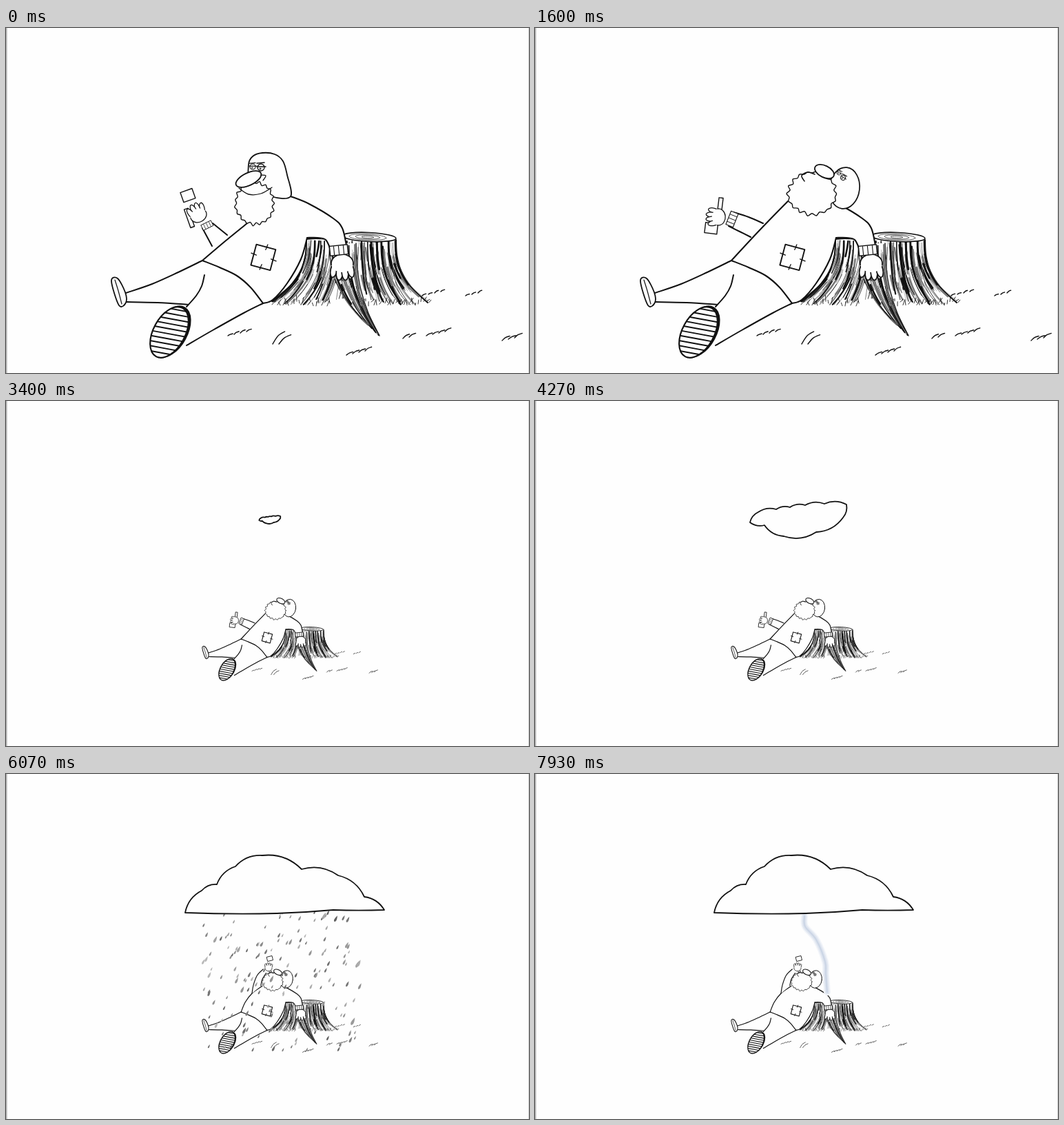
An HTML page with a canvas for the animation above (8 s loop, 759x500 px).

```html
<!DOCTYPE html>
<html>
<head>
<meta charset="utf-8">
<style>
html, body { margin: 0; height: 100%; overflow: hidden; background: #fefefe; }
canvas { display: block; }
</style>
</head>
<body>
<canvas id="stage" width="759" height="500"></canvas>
<script>
const g = document.getElementById('stage').getContext('2d');
const INK = '#111', PAPER = '#fefefe', LOOP = 8000, WIDE_FROM = 2930, PUFF_TIME = 1000;
let weight = 1;                      // line weight correction for the wide shot

const mix = (a, b, f) => a + (b - a) * f;
const unit = x => Math.max(0, Math.min(1, x));
const ease = x => { x = unit(x); return x * x * (3 - 2 * x); };
const pts = s => typeof s === 'string' ? s.trim().split(/\s+/).map(p => p.split(',').map(Number)) : s;

function rng(seed) {
  return () => (seed = (seed * 16807) % 2147483647) / 2147483647;
}

function paint(w, fill, ink = INK) {
  if (fill) { g.fillStyle = fill; g.fill(); }
  if (w) { g.strokeStyle = ink; g.lineWidth = w * weight; g.stroke(); }
}

// Smooth curve through points.
function trace(s, close) {
  const p = pts(s), n = p.length;
  const at = i => close ? p[(i + n) % n] : p[Math.max(0, Math.min(n - 1, i))];
  g.beginPath();
  g.moveTo(...p[0]);
  for (let i = 0; i < (close ? n : n - 1); i++) {
    const [a, b, c, d] = [at(i - 1), at(i), at(i + 1), at(i + 2)];
    g.bezierCurveTo(b[0] + (c[0] - a[0]) / 6, b[1] + (c[1] - a[1]) / 6,
      c[0] - (d[0] - b[0]) / 6, c[1] - (d[1] - b[1]) / 6, c[0], c[1]);
  }
}
const line = (s, w = 1.9, ink) => { trace(s); paint(w, null, ink); };
const blob = (s, w = 1.8) => { trace(s, true); paint(w, PAPER); };

function oval(x, y, rx, ry, turn = 0, w = 1.5, fill = PAPER) {
  g.beginPath();
  g.ellipse(x, y, rx, ry, turn, 0, 7);
  paint(w, fill);
}

function box(x, y, w, h) {
  g.beginPath();
  g.rect(x, y, w, h);
  paint(1.4, PAPER);
}

function placed(x, y, turn, size, fn) {
  g.save();
  g.translate(x, y);
  g.rotate(turn);
  g.scale(size, size);
  fn();
  g.restore();
}

// White area bounded by the given edges in order; only the edges are inked.
function panel(edges, w = 2) {
  g.beginPath();
  edges.flatMap(pts).forEach(p => g.lineTo(...p));
  paint(0, PAPER);
  edges.forEach(e => line(e, w));
}

function shaggy(x, y, rx, ry, teeth, seed) {
  const r = rng(seed);
  blob(Array.from({ length: teeth * 2 }, (_, i) => {
    const a = i * Math.PI / teeth, k = 1 + (i % 2 ? -0.09 : 0.05) * (0.3 + r());
    return [x + Math.cos(a) * rx * k, y + Math.sin(a) * ry * k];
  }), 1.4);
}

function cuff(x, y, turn, size = 1) {
  placed(x, y, turn, size, () => {
    box(-13, -7, 26, 14);
    for (let i = -7; i <= 7; i += 7) line([[i, -6], [i, 6]], 1.1);
  });
}

// Fingers point down before turning.
function hand(x, y, turn, size) {
  placed(x, y, turn, size, () => {
    for (let i = -1.5; i < 2; i++) oval(i * 8, 16 - i * i * 2, 4.8, 11, -i * 0.15, 1.7);
    oval(0, 2, 16, 13, 0, 0);
    g.beginPath();
    g.ellipse(0, 2, 16, 13, 0, Math.PI * 0.95, Math.PI * 2.05);
    paint(1.7);
  });
}

function pipe(x, y, turn) {
  placed(x, y, turn, 1, () => {
    box(-3, -26, 6, 28);
    box(-18, 12, 18, 15);
  });
}

function barkPoint(u, v) {
  return [mix(436 + 130 * u, 386 + 226 * u, v ** 2.6), mix(307, 396 + 5 * Math.sin(u * 9), v)];
}
function rootPoint(u, v) {
  return [mix(469, 508, u) + v ** 2.3 * mix(56, 34, u), mix(312, mix(430, 446, u), v)];
}

function bark(at, count, seed) {
  const r = rng(seed);
  for (let i = 0; i < count; i++) {
    const u = r(), v = r() * 0.75, end = Math.min(1, v + 0.15 + r() * 0.5), lean = (r() - 0.5) * 0.05;
    line([0, 0.35, 0.7, 1].map(f => at(u + lean * f, mix(v, end, f))),
      0.5 + r() ** 3 * 2.2, r() < 0.45 ? '#777' : INK);
  }
}

function stump() {
  const steps = [0, 0.25, 0.5, 0.75, 1], r = rng(12);
  panel([steps.map(v => barkPoint(0, v)), steps.map(v => barkPoint(1, 1 - v))]);
  bark(barkPoint, 230, 41);
  for (let i = 0; i < 16; i++) {
    const u = (i + r()) / 16, len = 0.4 + r() * 0.5;
    line(steps.map(v => barkPoint(u, 0.02 + v * len)), 1.3 + r() * 2);
  }
  panel([steps.map(v => rootPoint(0, v)), steps.map(v => rootPoint(1, 1 - v))], 1.4);
  bark(rootPoint, 65, 97);
  oval(527, 303, 39, 6.5, 0.05, 1.7);
  for (let i = 1; i < 4; i++) oval(525, 303, 36 - i * 9, 6 - i * 1.5, 0.05, 0.7);
  line('435,306 450,305 470,306');
  for (let x = 382; x < 618; x += 4) {
    if (x > 470 && x < 516) continue;
    const y = 395 + r() * 8;
    line([[x, y], [x + (r() - 0.3) * 8, y - 3 - r() * 6]], 0.9);
  }
}

function grass() {
  const r = rng(5);
  // x, y, blades, blade length
  for (const [x, y, n, len] of [[322, 446, 4, 9], [387, 458, 2, 22], [494, 474, 4, 12], [576, 450, 2, 12],
    [610, 446, 4, 11], [604, 388, 4, 7], [667, 388, 3, 7], [720, 453, 3, 14]])
    for (let i = 0; i < n; i++) {
      const a = x + i * 9, b = y - i * (len > 20 ? 0 : 2), rise = len * (len > 20 ? 0.95 : 0.55) * (0.6 + r() * 0.4);
      line([[a, b], [a + len * 0.35, b - rise * 0.65], [a + len * 0.8, b - rise]], 1.4);
    }
}

function legs() {
  panel(['285,337 250,354 212,371 174,384', '175,397 220,398 266,401']);
  blob('153,367 162,363 173,383 174,398 164,402');
  line('158,365 163,381 168,400', 1.2);
  panel(['288,358 284,374 276,388 262,404', '262,460 300,438 345,413 373,399']);
  oval(240, 440, 23, 40, 0.5, 1.5, INK);
  oval(237, 441, 23, 40, 0.5, 2.2);
  g.save();
  g.clip();
  for (let y = 398; y < 485; y += 7.4) line([[205, y - 5], [270, y + 7]]);
  g.restore();
}

function torso(left) {
  panel([left, '413,244 440,255 475,276 488,290 494,315', '471,321 464,307 452,304 437,304',
    '437,304 428,335 408,370 387,394 373,399', '373,399 355,376 335,359 310,347 285,337'], 2.1);
  placed(374, 332, 0.26, 1, () => {
    g.beginPath();
    g.rect(-15, -15, 29, 31);
    paint(1.9);
    for (let i = 0; i < 4; i++) {
      g.rotate(Math.PI / 2);
      line([[0, -11], [1, -19]], 1.3);
    }
  });
}

function eye(x, y, turn, size) {
  placed(x, y, turn, size, () => {
    oval(0, 0, 5, 5, 0, 1.3);
    line([[-6, -1], [7, -1]], 1.5);
    line([[-6, -6], [5, -7]], 1.5);
    oval(-1, 2, 1, 1, 0, 1);
  });
}

function uprightHead() {
  blob('352,198 358,186 372,181 390,183 402,193 408,213 413,244 385,244 355,225');
  shaggy(361, 254, 28, 31, 19, 5);
  line('338,232 352,241 370,240 386,231', 1.3);
  eye(358, 201, 0, 0.8);
  eye(370, 202, 0, 1);
  oval(352, 219, 20, 9, -0.45, 1.8);
  line('370,213 377,214 373,221', 1.3);
}

function tiltedHead() {
  oval(449, 232, 22, 30, 0.12, 1.7);
  shaggy(402, 240, 35, 31, 18, 23);
  eye(441, 210, 0.6, 0.6);
  eye(447, 217, 0.6, 0.7);
  oval(420, 208, 15, 8.5, 0.45, 1.8);
  line('391,222 387,214 396,209 406,212', 1.6);
}

function readArm(f) {
  const dx = 70 * f, dy = -55 * f;
  panel([[[299, 316], [285 + dx, 290 + dy]], [[300 + dx, 283 + dy], [321, 300]]]);
  pipe(262 + dx, 264 + dy, 2.8);
  hand(280 + dx, 273 + dy, 2.7, 0.75);
  cuff(292 + dx, 286 + dy, -0.45, 0.6);
}

function lowArm() {
  panel(['288,267 310,274 331,283', '313,303 297,295 281,287']);
  pipe(267, 272, 0.12);
  hand(268, 274, 1.6, 0.75);
  cuff(286, 277, 1.95, 0.8);
}

function highArm() {
  panel(['308,254 325,265 338,276', '316,297 303,286 288,274']);
  pipe(279, 250, 0.95);
  hand(283, 256, 2.3, 0.75);
  cuff(298, 264, 2.3, 0.8);
}

function raisedArm() {
  panel(['322,274 327,245 340,212 360,192', '370,205 357,226 352,248']);
  pipe(378, 177, 2.9);
  hand(378, 190, 3.2, 0.75);
}

function smoke(p) {
  if (p > 630) return;
  const rise = Math.max(0, p - 340) * 1.05;
  g.save();
  g.beginPath();
  g.rect(200, -68, 400, 500);
  g.clip();
  g.translate(Math.sin(rise / 60) * 8, 208 - rise);
  g.scale(1, mix(0.85, 1, unit(p / 200)));
  trace('6,-98 15,-74 13,-42 -3,-45 -8,-63 -4,-89', true);
  paint(1.5, null, '#444');
  line('-5,-44 -12,-28 -12,2', 1.5, '#444');
  line('11,-42 15,-29 10,-12 -4,4', 1.5, '#444');
  g.restore();
}

// Each puff: draw on the pipe, blow out, lower the arm, lift it again.
function poseAt(t) {
  if (t < 660) return 'read';
  if (t < 930 || t >= 5260) return 'draw';
  const p = (t - 930) % PUFF_TIME, low = t < 1930 ? [330, 800] : [270, 530];
  return p >= 800 ? 'draw' : p >= low[0] && p < low[1] ? 'low' : 'high';
}

function man(t) {
  const pose = poseAt(t);
  legs();
  if (pose === 'read') {
    const f = ease((t - 330) / 330);
    readArm(f);
    torso('285,337 318,309 350,283');
    uprightHead();
    if (f) readArm(f);
  } else if (pose === 'draw') {
    torso('285,337 299,304 322,274 357,249');
    placed(-10, -6, 0, 1, tiltedHead);
    raisedArm();
  } else {
    pose === 'low' ? lowArm() : highArm();
    torso('285,337 326,293 367,251');
    tiltedHead();
    smoke((t - 930) % PUFF_TIME);
  }
  hand(488, 339, 0, 1);
  cuff(483, 322, -0.1);
}

const PUFF = pts('312,176 324,161 350,157 370,154 392,151 420,149 452,150 447,169 408,190 361,196 333,180');
const STORM = pts('260,201 284,169 306,160 333,134 372,118 429,138 482,147 520,178 549,197 475,197 393,202');

function cloud(t) {
  const size = 0.6 * ease((t - 3260) / 340) + 0.25 * ease((t - 3600) / 300) + 0.15 * ease((t - 3930) / 200);
  if (size < 0.02) return;
  const f = ease((t - 4270) / 660);
  const p = PUFF.map(([x, y], i) => [mix(383 + (x - 383) * size, STORM[i][0], f),
    mix(172 + (y - 172) * size, STORM[i][1], f)]);
  g.beginPath();
  g.moveTo(...p[0]);
  p.forEach(([x, y], i) => {
    const [u, v] = p[(i + 1) % p.length], bump = i < 8 ? 0.24 : mix(0.24, 0.015, f);
    g.quadraticCurveTo((x + u) / 2 + (v - y) * bump, (y + v) / 2 - (u - x) * bump, u, v);
  });
  g.closePath();
  paint(1.8, PAPER);
}

function rain(t) {
  if (t < 5520 || t > 7860) return;
  const r = rng(7741), speed = 0.42, front = (t - 5490) * speed, tail = (t - 7400) * speed;
  for (let i = 0; i < 165; i++) {
    const x = 279 + r() * 235, y = (r() * 200 + t * speed) % 200, s = 0.7 + r() * r(), shade = 95 + r() * 90 | 0;
    if (y > front || y < tail) continue;
    placed(x, 201 + y, 0, s, () => {
      g.beginPath();
      g.moveTo(3.4, -5);
      g.quadraticCurveTo(3, 2, 0, 2);
      g.quadraticCurveTo(-2, 0, 3.4, -5);
      paint(0, `rgb(${shade},${shade},${shade})`);
    });
  }
}

function bolt(t) {
  if (t < 7860) return;
  const path = '391,206 392,221 408,240 421,272 422,290 424,316';
  [['#f1f4f9', 10], ['#e0e6f0', 6.5], ['#ccd6e6', 2.5]].forEach(([ink, w]) => line(path, w, ink));
}

function render(now) {
  const t = Math.floor((now % LOOP + 4) * 0.015) / 0.015 % LOOP;   // 15 pictures a second
  const wide = t >= WIDE_FROM;
  g.lineCap = g.lineJoin = 'round';
  g.fillStyle = PAPER;
  g.fillRect(0, 0, 759, 500);
  placed(wide ? 219.5 : 0, wide ? 201 : 0, 0, wide ? 0.427 : 1, () => {
    weight = wide ? 1.15 : 1;
    stump();
    grass();
    weight = wide ? 1.35 : 1;
    man(t);
  });
  weight = 1;
  if (wide) {
    rain(t);
    bolt(t);
    cloud(t);
  }
  g.fillStyle = '#b2b2b2';
  g.fillRect(0, 0, 1.6, 500);
  g.fillStyle = '#d0d0d0';
  g.fillRect(758, 0, 1, 500);
}

const start = performance.now();
function tick() {
  render(performance.now() - start);
  requestAnimationFrame(tick);
}
tick();
</script>
</body>
</html>
```
